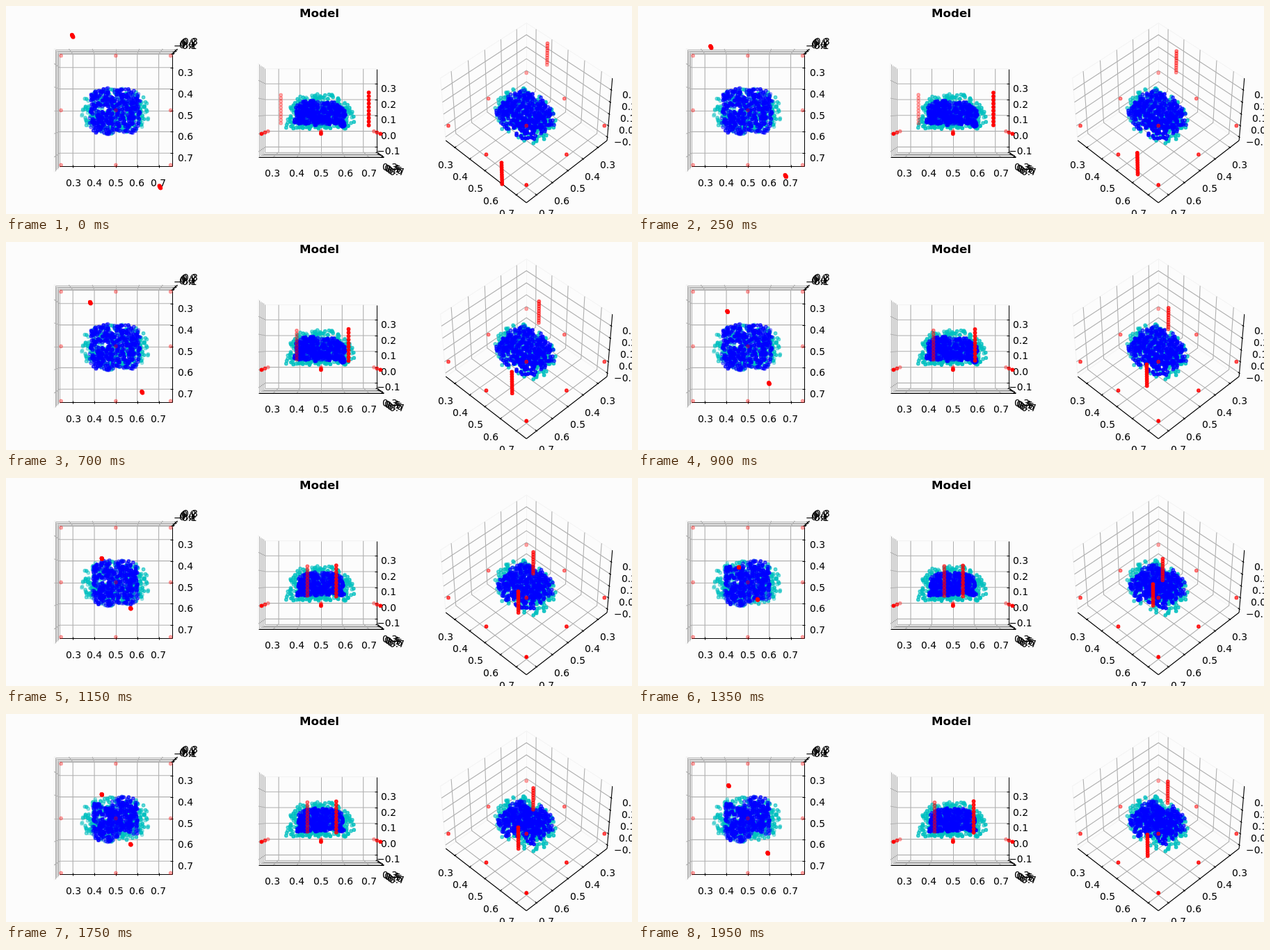
Animation of 900 by 300 pixels, one loop 2000 ms. Source, as an HTML page with a canvas:

```html
<!DOCTYPE html>
<html lang="en">
<head>
<meta charset="utf-8">
<title>Model</title>
<style>
  html, body { margin: 0; width: 100%; height: 100%; overflow: hidden; background: #fcfcfc; }
  canvas { display: block; width: 900px; height: 300px; }
</style>
</head>
<body>
<canvas id="stage" width="900" height="300"></canvas>
<script>
const ctx = document.getElementById('stage').getContext('2d');
const LOOP = 2000, STEP = 50;

// Perspective plot box: data centre, data-to-world scale, camera
const MID = [0.5, 0.5, 0.132];
const SCALE = [2.286, 2.286, 1.7145];
const HALF = 0.2625, LABEL_HALF = 0.31;
const DIST = 10, ZOOM = 1410, CY = 150.5;
const TICKS = [[0.3, 0.4, 0.5, 0.6, 0.7], [0.3, 0.4, 0.5, 0.6, 0.7], [-0.1, 0, 0.1, 0.2, 0.3]];

// shift: label offset in pixels for the x, y and z axes
const makeView = (cx, elev, azim, shift) => {
  const rad = Math.PI / 180;
  return {
    cx, shift,
    se: Math.sin(elev * rad), ce: Math.cos(elev * rad),
    sa: Math.sin(azim * rad), ca: Math.cos(azim * rad)
  };
};
const VIEWS = [
  makeView(157.9, 90, 0, [[5, 7], [0, 10], [4, 3]]),
  makeView(452.9, 0, 0, [[4, 10], [0, 10], [4, 6.5]]),
  makeView(748.2, 45, 45, [[3, 10], [-3, 10], [5, 6.5]])
];

function project(view, p) {
  const [x, y, z] = p.map((c, i) => (c - MID[i]) * SCALE[i]);
  const ahead = x * view.ca + y * view.sa;
  const side = y * view.ca - x * view.sa;
  const w = DIST - ahead * view.ce - z * view.se;
  const up = z * view.ce - ahead * view.se;
  return [view.cx + ZOOM * side / w, CY - ZOOM * up / w, w];
}

// Seeded random numbers
let seed = 20;
function random() {
  seed = (seed + 0x6D2B79F5) | 0;
  let t = Math.imul(seed ^ (seed >>> 15), 1 | seed);
  t = (t + Math.imul(t ^ (t >>> 7), 61 | t)) ^ t;
  return ((t ^ (t >>> 14)) >>> 0) / 4294967296;
}
const spread = r => (random() * 2 - 1) * r;

// Flat-bottomed dome filled with points
function dome(count, [rx, ry, height], base, pow, topPow) {
  const points = [];
  while (points.length < count) {
    const x = spread(1), y = spread(1), z = random();
    if (Math.abs(x) ** pow + Math.abs(y) ** pow + z ** topPow <= 1)
      points.push([0.504 + x * rx, 0.498 + y * ry, base + z * height]);
  }
  return points;
}

const shell = dome(380, [0.104, 0.156, 0.215], 0.024, 2.5, 2.6);
const body = dome(440, [0.105, 0.106, 0.14], 0.053, 4, 4);
const looseBody = body.map(([x, y, z]) => [
  x + spread(0.004),
  0.5 + (y - 0.5) * 1.08 + spread(0.006),
  z - 0.1 * (y - 0.5) - 0.006 + spread(0.009)
]);

const clamp = v => Math.max(0, Math.min(1, v));
const DIR = [Math.sqrt(3) / 2, 0.5];

// Fingers press a dent into the body from both sides
function bodyAt(t) {
  if (t < 1100) return looseBody;
  const press = 0.5 * clamp((t - 1150) / 350);
  return body.map(([x, y, z]) => {
    const dx = x - 0.505, dy = y - 0.502;
    const along = dx * DIR[0] + dy * DIR[1];
    const across = dy * DIR[0] - dx * DIR[1];
    const move = -along * press * Math.exp(-((across / 0.031) ** 2));
    return [x + move * DIR[0], y + move * DIR[1], z];
  });
}

function gripAt(t) {
  const speed = 0.01133 / STEP, closed = 0.083;
  if (t < 1350) return closed + (1350 - t) * speed;
  return closed + Math.max(0, t - 1550) * speed;
}

function markersAt(t) {
  const points = [], r = gripAt(t);
  for (const x of [0.25, 0.5, 0.75])
    for (const y of [0.25, 0.5, 0.75]) points.push([x, y, 0]);
  for (const s of [-1, 1])
    for (let i = 0; i < 10; i++)
      points.push([0.505 + s * r * DIR[0], 0.502 + s * r * DIR[1], 0.05 + i * 0.02]);
  return points;
}

// Far points are drawn first and fade with depth
function scatter(view, points, color) {
  const dots = points.map(p => project(view, p)).sort((a, b) => b[2] - a[2]);
  const far = dots[0][2], near = dots[dots.length - 1][2];
  ctx.fillStyle = ctx.strokeStyle = color;
  ctx.lineWidth = 1.39;
  for (const [x, y, w] of dots) {
    ctx.globalAlpha = 1 - 0.7 * (w - near) / (far - near);
    ctx.beginPath();
    ctx.arc(x, y, 2.2, 0, 7);
    ctx.fill();
    ctx.stroke();
  }
  ctx.globalAlpha = 1;
}

// Paths of only upright and level segments snap to whole pixels
function line(view, color, ...points) {
  let path = points.map(p => project(view, p));
  const level = path.every(([x, y], i) => {
    const [px, py] = path[Math.max(0, i - 1)];
    return Math.abs(x - px) < 0.01 || Math.abs(y - py) < 0.01;
  });
  if (level) path = path.map(([x, y]) => [Math.round(x) + 0.5, Math.round(y) + 0.5]);
  ctx.strokeStyle = color;
  ctx.lineWidth = level ? 1 : 1.11;
  ctx.beginPath();
  for (const [x, y] of path) ctx.lineTo(x, y);
  ctx.stroke();
}

function centerText(text, x, y) {
  ctx.fillStyle = '#000';
  ctx.fillText(text, Math.round(x - ctx.measureText(text).width / 2), Math.round(y));
}

// Point with one coordinate given and the others at -1..1 times half the box
function at(axis, value, sides, half = HALF) {
  return MID.map((m, i) => i === axis ? value : m + sides[i] * half);
}

// Side of the box on which each axis line lies
const EDGE = [[0, 1, -1], [1, 0, -1], [-1, 1, 0]];
const TICK_DIR = [1, 0, 1];

function drawBox(view) {
  const corner = (...sides) => at(-1, 0, sides);
  const pale = '#f3f3f3';
  line(view, pale, corner(1, -1, -1), corner(1, -1, 1), corner(-1, -1, 1), corner(-1, 1, 1));
  line(view, pale, corner(1, -1, -1), corner(-1, -1, -1), corner(-1, 1, -1));
  line(view, pale, corner(-1, -1, -1), corner(-1, -1, 1));

  for (let axis = 0; axis < 3; axis++) {
    const [a, b] = [0, 1, 2].filter(i => i !== axis);
    for (const v of TICKS[axis]) {
      const far = [-1, -1, -1], endA = [-1, -1, -1], endB = [-1, -1, -1];
      endA[a] = 1;
      endB[b] = 1;
      line(view, '#b0b0b0', at(axis, v, endA), at(axis, v, far), at(axis, v, endB));
    }
  }

  ctx.font = '13.89px "DejaVu Sans", sans-serif';
  for (let axis = 0; axis < 3; axis++) {
    const edge = EDGE[axis];
    line(view, '#000', at(axis, MID[axis] - HALF, edge), at(axis, MID[axis] + HALF, edge));
    for (const v of TICKS[axis]) {
      const inner = at(axis, v, edge), outer = at(axis, v, edge);
      inner[TICK_DIR[axis]] -= 0.0083;
      outer[TICK_DIR[axis]] += 0.0042;
      line(view, '#000', inner, outer);
      const [x, y] = project(view, at(axis, v, edge, LABEL_HALF));
      const [sx, sy] = view.shift[axis];
      centerText(v.toFixed(1).replace('-', '\u2212'), x + sx, y + sy + 5);
    }
  }
}

function draw(t) {
  ctx.fillStyle = '#fcfcfc';
  ctx.fillRect(0, 0, 900, 300);
  ctx.font = 'bold 16.67px "DejaVu Sans", sans-serif';
  centerText('Model', 450, 16);
  const solid = bodyAt(t), markers = markersAt(t);
  for (const view of VIEWS) {
    drawBox(view);
    scatter(view, shell, '#00bfbf');
    scatter(view, solid, '#0000ff');
    scatter(view, markers, '#ff0000');
  }
}

const start = performance.now();
let shown = -1;
function tick() {
  const t = Math.floor((performance.now() - start) % LOOP / STEP) * STEP;
  if (t !== shown) draw(shown = t);
  requestAnimationFrame(tick);
}
tick();
</script>
</body>
</html>
```
